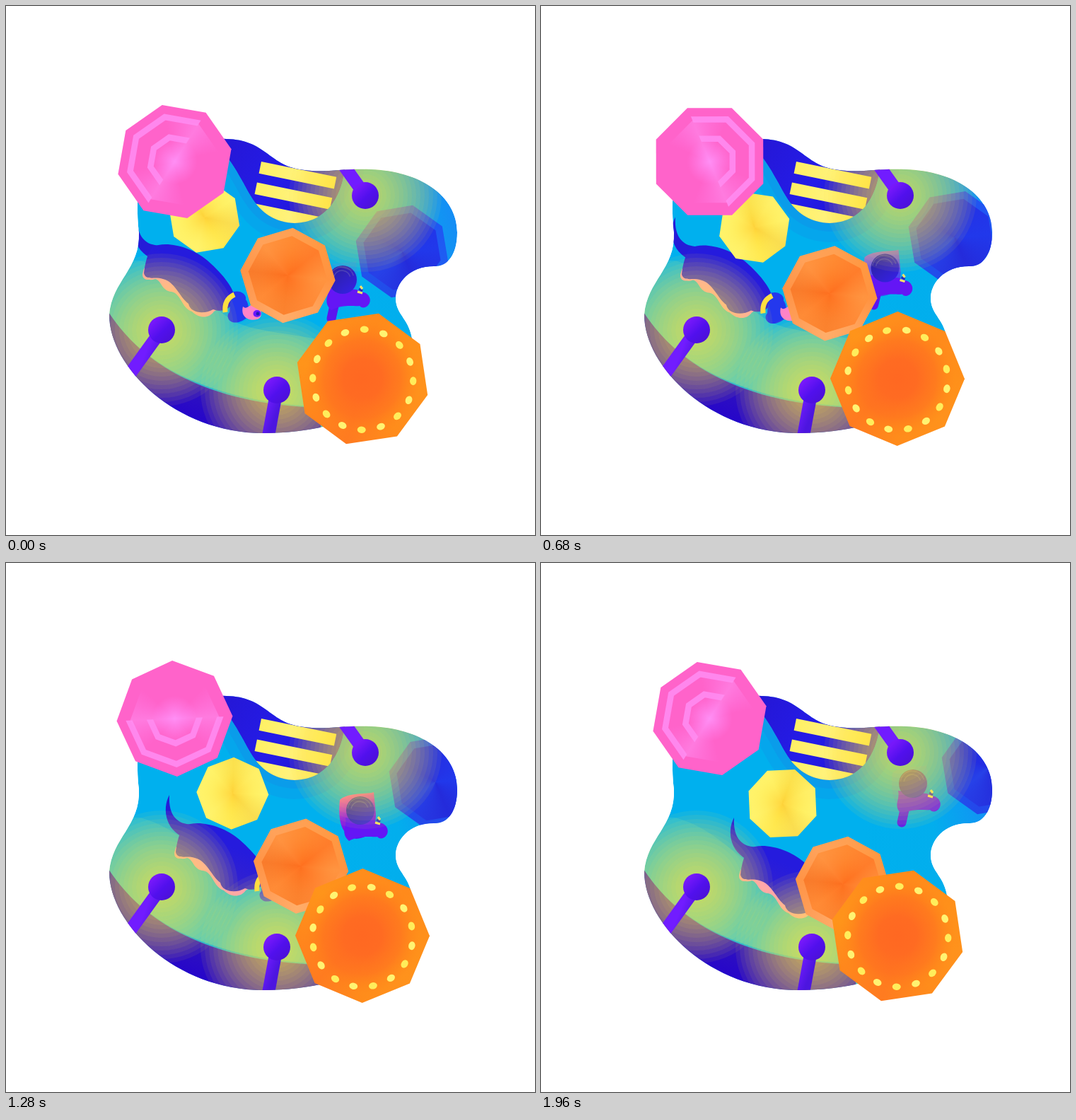
Recreate the animation shown at these times as an HTML page with a canvas. Size 748 by 748 pixels, loop 2000 ms.

```html
<!DOCTYPE html>
<html>
<head>
<meta charset="utf-8">
<style>
html, body { margin: 0; width: 100%; height: 100%; overflow: hidden; background: #fff; }
canvas { display: block; width: 748px; height: 748px; }
</style>
</head>
<body>
<canvas id="stage" width="748" height="748"></canvas>
<script>
const c = document.getElementById('stage').getContext('2d');
const RAD = Math.PI / 180, TAU = Math.PI * 2;

const pool = new Path2D('M200 215 C250 190 285 187 312 188 C366 189 372 224 415 231 C450 237 475 229 515 231 C585 233 638 268 638 320 C638 352 624 369 605 368 C570 368 551 392 551 414 C552 438 571 442 575 475 C580 545 500 604 363 604 C240 604 146 510 146 437 C150 388 190 372 188 320 C184 285 185 240 200 215Z');
const deck = new Path2D('M300 180 L480 220 C478 262 458 306 408 307 C358 305 345 265 332 244 C324 230 316 215 300 200Z');
const shore = new Path2D('M140 425 C185 500 275 563 445 568 L445 620 L120 620Z');
const shallows = new Path2D('M120 360 L190 360 C245 375 280 418 318 443 C350 463 400 460 470 478 L470 568 C275 563 185 500 140 425Z');
const tail = new Path2D('M205 308 C194 328 199 362 235 372 L244 349 C222 352 203 343 205 308Z');
const belly = new Path2D('M217 372 C205 385 215 397 229 392 C238 394 238 409 252 410 C266 413 266 433 281 438 C291 448 305 448 312 438 L322 432 L240 362Z');
const body = new Path2D('M226 352 C245 342 282 352 304 371 C328 392 342 412 342 424 C338 440 325 445 312 440 C300 447 280 446 277 432 C264 422 258 401 241 397 C229 393 217 400 214 389 C215 377 219 360 226 352Z');
const dogHead = new Path2D('M337 417 C346 411 360 417 358 426 C364 434 361 443 362 449 C356 457 343 461 337 457 C332 454 331 447 335 444Z');
const snout = new Path2D('M354 436 C361 442 363 430 371 435 C382 437 383 452 374 454 C364 457 350 452 354 436Z');

// Motion by key times; everything else is linear or periodic.
const keys = [0, 200, 480, 880, 1280, 1680, 1960];
function track(values, t) {
  let i = 0;
  while (i < keys.length - 2 && t > keys[i + 1]) i++;
  return mix(values[i], values[i + 1], (t - keys[i]) / (keys[i + 1] - keys[i]));
}
const mix = (a, b, k) => a + (b - a) * k;

function fill(path, style) { c.fillStyle = style; c.fill(path); }

function linear(x0, y0, x1, y1, ...stops) {
  const g = c.createLinearGradient(x0, y0, x1, y1);
  stops.forEach((s, i) => g.addColorStop(i / (stops.length - 1), s));
  return g;
}
function radial(r, ...stops) {
  const g = c.createRadialGradient(0, 0, 0, 0, 0, r);
  stops.forEach((s, i) => g.addColorStop(i / (stops.length - 1), s));
  return g;
}
function conic(...stops) {
  const g = c.createConicGradient(0, 0, 0);
  stops.forEach((s, i) => g.addColorStop(i / (stops.length - 1), s));
  return g;
}
function ellipse(x, y, rx, ry, style, turn = 0) {
  c.beginPath();
  c.ellipse(x, y, rx, ry, turn, 0, TAU);
  c.fillStyle = style;
  c.fill();
}
function octagon(r) {
  const p = new Path2D();
  for (let i = 0; i < 8; i++) p.lineTo(r * Math.cos(i * TAU / 8), r * Math.sin(i * TAU / 8));
  p.closePath();
  return p;
}
function at(x, y, degrees, draw) {
  c.save();
  c.translate(x, y);
  c.rotate(degrees * RAD);
  draw();
  c.restore();
}

function pinkParasol() {
  fill(octagon(82), '#ff63ca');
  c.save();
  c.beginPath();
  c.moveTo(0, 0);
  c.arc(0, 0, 90, 0, Math.PI);
  c.clip();
  c.strokeStyle = '#ff87ed';
  c.lineWidth = 8.5;
  c.stroke(octagon(64.5));
  c.stroke(octagon(35));
  c.restore();
  const clear = 'rgba(255,130,238,0)', light = 'rgba(255,142,240,.55)';
  fill(octagon(63), conic(light, clear, clear, clear, light, clear, clear, clear, light));
  fill(octagon(40), radial(32, '#ff8ff5', clear));
}

function yellowParasol() {
  fill(octagon(51), conic('#fff36a', '#fbe04d', '#fff068', '#fff36a', '#f9dc50', '#ffe950', '#fff36c', '#fff36a', '#fff36a'));
  fill(octagon(51), radial(48, 'rgba(255,204,48,.75)', 'rgba(255,220,60,.3)', 'rgba(255,240,90,0)'));
}

function peachParasol() {
  fill(octagon(67.5), conic('#ffa052', '#ff9842', '#ff9340', '#ffa25a', '#ffad69', '#ff9e58', '#ff9446', '#ffa25a', '#ffa052'));
  fill(octagon(56), conic('#ff8a32', '#ff7d2b', '#ff9440', '#ff8936', '#fb822e', '#ff8b36', '#f97b2b', '#ff9340', '#ff8a32'));
  fill(octagon(56), radial(48, 'rgba(255,104,24,.7)', 'rgba(255,112,28,.35)', 'rgba(255,125,40,0)'));
}

function orangeParasol() {
  fill(octagon(95), conic('#ff921c', '#ff8c1b', '#ff7b20', '#ff871c', '#ff941a', '#ff8d1c', '#ff8a1b', '#ff901a', '#ff921c'));
  fill(octagon(95), radial(82, '#ff6822', '#ff6b22', 'rgba(255,112,32,.65)', 'rgba(255,130,24,0)'));
  for (let i = 0; i < 16; i++) {
    const a = (i + .45) * TAU / 16;
    ellipse(71 * Math.cos(a) + 1, 71 * Math.sin(a) + 1, 4.7, 6, i % 2 ? '#ffed5b' : '#fff372', a);
  }
}

function blueParasol() {
  fill(octagon(67), conic('#2348f2e0', '#2055f2e0', '#263ce9e0', '#244eeee0', '#2348f2e0'));
  fill(octagon(56), conic('#2431e5', '#2138eb', '#242bdb', '#2741e8', '#222ce2', '#2431e5'));
}

function dog() {
  fill(tail, '#251bd8');
  ellipse(219, 391, 7, 7, '#ff98c4');
  c.save();
  c.translate(1, 5);
  fill(belly, '#ff98c4');
  c.restore();
  fill(body, linear(270, 370, 248, 420, '#251bdd', '#3422cd'));
  fill(dogHead, '#2438ed');
  fill(snout, '#ff83c7');
  ellipse(374, 446, 5.5, 5, '#661aff');
  ellipse(375, 446, 2.4, 2.5, '#241bb0');
  c.beginPath();
  c.moveTo(342, 419);
  c.quadraticCurveTo(327, 426, 329, 444);
  c.lineWidth = 7;
  c.strokeStyle = '#ffdf42';
  c.stroke();
}

function swimmer(t) {
  const foot = track([59, 60, 61, 52, 34, 34, 59], t);
  const shoulder = track([.1, .1, .25, 1, 1, 1, .1], t);
  c.globalAlpha = shoulder;
  fill(new Path2D('M-29 -15 C-18 -26 12 -23 19 -26 L22 5 C22 25 16 38 -6 40 C-31 35 -31 5 -29 -15Z'), linear(-20, -22, 0, 35, '#ff55b7', '#8d16e9', '#5c12f0'));
  c.globalAlpha = 1;
  c.lineWidth = 13;
  c.lineCap = 'round';
  c.strokeStyle = '#5b14ef';
  c.beginPath();
  c.moveTo(-10, 28);
  c.lineTo(-16, foot - 4);
  c.stroke();
  fill(new Path2D('M-21 10 C-18 24 -29 31 -16 43 C0 34 16 38 24 37 C30 44 42 35 38 25 C34 16 25 18 20 14Z'), '#6416f5');
  c.lineCap = 'butt';
  c.lineWidth = 3;
  for (let i = 0; i < 3; i++) {
    c.strokeStyle = i === 1 ? '#3523bb' : '#ffe365';
    c.beginPath();
    c.moveTo(21 + i * 2, 17 - i * 4);
    c.lineTo(28, 19 - i * 3);
    c.stroke();
  }
  ellipse(0, 0, 20, 20, linear(-12, -14, 12, 16, '#2d21a7', '#3421de'));
  c.strokeStyle = 'rgba(105,95,185,.55)';
  c.lineWidth = 1.5;
  for (const r of [12, 17]) {
    c.beginPath();
    c.arc(-1, -1, r, 3.3, 6);
    c.stroke();
  }
}

function stripes() {
  c.save();
  c.clip(deck);
  fill(deck, linear(310, 200, 460, 300, '#2517d7', '#241ce8', '#2110cc'));
  at(361, 220, 11.6, () => {
    c.fillStyle = linear(0, 0, 108, 0, '#fff064', '#fff27a', '#ffe45c');
    for (let i = 0; i < 3; i++) c.fillRect(0, i * 30, 108.5, i === 2 ? 40 : 17);
  });
  c.restore();
}

function glow(x, y, size = 108) {
  for (let k = 1; k <= 18; k++) {
    ellipse(x, y, size * k / 18, size * k / 18, 'rgba(255,221,65,.069)');
  }
}

function lamp(x, y, endX, endY) {
  c.lineWidth = 18;
  c.strokeStyle = linear(x - 10, y, x + 10, y + 8, '#711cff', '#4c15df');
  c.beginPath();
  c.moveTo(x, y);
  c.lineTo(endX, endY);
  c.stroke();
  ellipse(x, y, 19, 19, linear(x - 13, y - 10, x + 13, y + 17, '#7618fa', '#5110ed', '#4b10d6'));
}

const lamps = [[508, 268, 473, 219], [220, 458, 176, 519], [383, 543, 371, 608]];

function draw(t) {
  const p = t / 1960;
  c.clearRect(0, 0, 748, 748);
  c.save();
  c.clip(pool);
  fill(pool, linear(450, 350, 640, 310, '#00b0ee', '#02aeed', '#168cf5'));
  c.lineWidth = 54;
  c.strokeStyle = 'rgba(30,125,225,.18)';
  c.stroke(deck);
  c.lineWidth = 24;
  c.strokeStyle = 'rgba(35,110,220,.18)';
  c.stroke(deck);
  stripes();
  fill(shallows, linear(280, 380, 245, 520, 'rgba(105,220,184,.2)', 'rgba(125,222,164,.5)'));
  fill(shore, linear(280, 500, 250, 590, '#361eb7', '#2402cc'));
  at(mix(560, 632, p), mix(347, 290, p), -77, blueParasol);
  at(track([-19, -24, -30, 0, 26, 51, 68], t), track([-11, -15, -19, 0, 20, 38, 52], t), 0, dog);
  at(track([476, 479, 483, 490, 501, 516, 526], t), track([387, 381, 374, 367, 350, 327, 312], t), 0, () => swimmer(t));
  lamps.forEach(([x, y]) => glow(x, y));
  lamps.forEach(l => lamp(...l));
  c.restore();

  at(mix(280.5, 341.5, p), mix(299, 340, p), mix(-167, -115, p), yellowParasol);
  at(mix(398.5, 427, p), mix(381, 454, p), -84, peachParasol);
  at(238.5, 220, 122.5 + 360 * p, pinkParasol);
  const swing = 1 - Math.abs(1 - 2 * p);
  at(504, 527, 14 + 45 * swing, orangeParasol);
}

function tick(now) {
  draw(Math.floor(now % 2000 / 40) * 40);
  requestAnimationFrame(tick);
}
draw(0);
requestAnimationFrame(tick);
</script>
</body>
</html>
```
